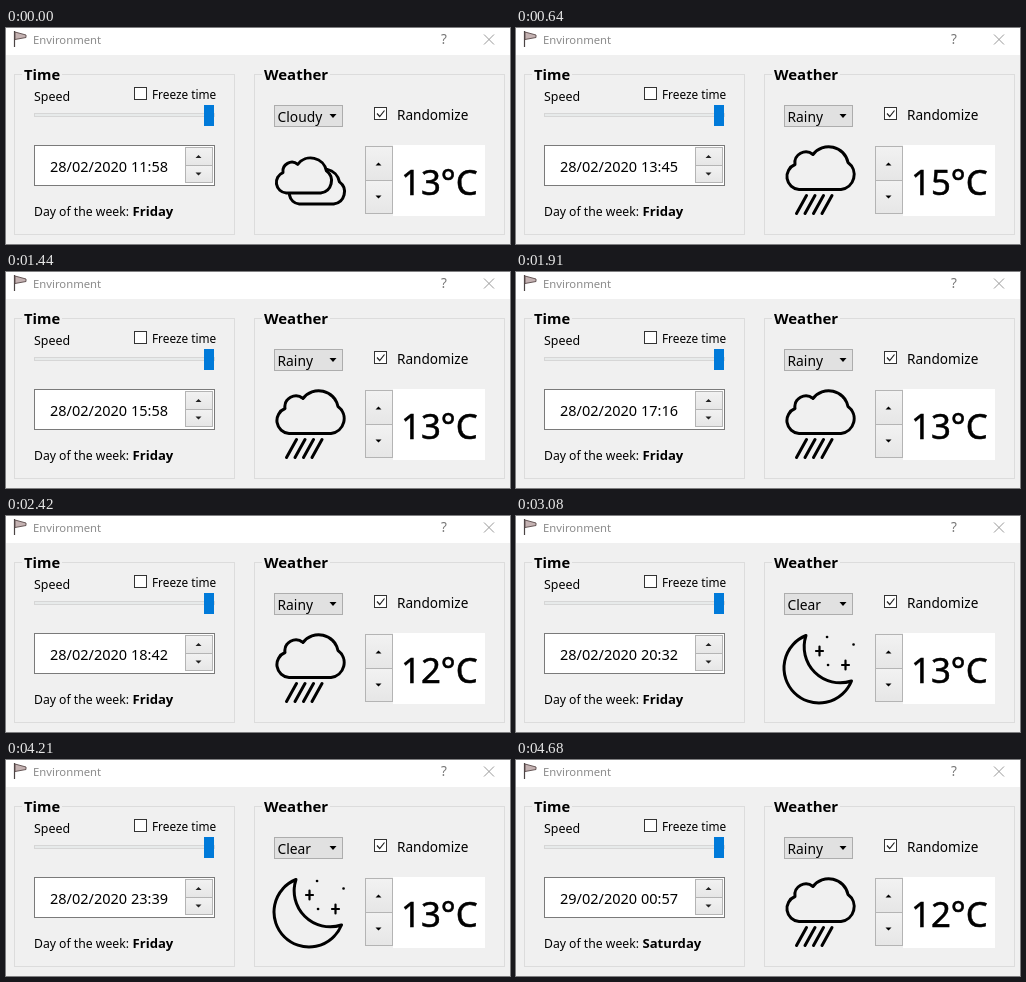
Animation of 504 by 216 pixels, one loop 4720 ms. Source, as an HTML page:

```html
<!DOCTYPE html>
<html lang="en">
<head>
<meta charset="utf-8">
<title>Environment</title>
<style>
  html, body { margin: 0; width: 100%; height: 100%; overflow: hidden; background: #f0f0f0; }
  svg { display: block; width: 504px; height: 216px; }
  text { font-family: "Noto Sans", "Open Sans", sans-serif; white-space: pre; }
  .bold { font-weight: 700; }
  .crisp { shape-rendering: crispEdges; }
  .group { fill: none; stroke: #dcdcdc; }
  .field { fill: #fff; stroke: #7a7a7a; }
  .button { fill: url(#shade); stroke: #b4b4b4; }
  .combo { fill: #e1e1e1; stroke: #adadad; }
  .box { fill: #fff; stroke: #333; }
  .icon { display: none; fill: none; stroke: #000; stroke-width: 3; stroke-linecap: round; stroke-linejoin: round; }
  .cloud { fill: #f0f0f0; vector-effect: non-scaling-stroke; }
  [data-weather="Cloudy"] .cloudy,
  [data-weather="Rainy"] .rainy,
  [data-weather="Clear"] .clear { display: inline; }
</style>
</head>
<body>
<svg id="panel" viewBox="0 0 504 216" data-weather="Cloudy">
  <defs>
    <linearGradient id="shade" x2="0" y2="1">
      <stop stop-color="#f2f2f2"/>
      <stop offset="1" stop-color="#e6e6e6"/>
    </linearGradient>
    <path id="cloud" class="cloud" d="M283 161.500A13 13 0 0 1 279 136.500A11 11 0 0 1 297 126.500A19.700 19.700 0 0 1 332 134.500A15 15 0 0 1 325 161.500Z"/>
  </defs>
  <rect width="504" height="216" fill="#f0f0f0"/>

  <!-- title bar -->
  <rect width="504" height="27" fill="#fff"/>
  <path d="M8.500 3V19" stroke="#4a4444" stroke-width="1.2"/>
  <path d="M9 4L20 7V9.500L9 11.500Z" fill="#c4b2b2" stroke="#5a4a4a" stroke-width=".9"/>
  <text x="27" y="15.5" font-size="11.3" fill="#8c8c8c">Environment</text>
  <text x="435" y="16" font-size="13.5" fill="#777">?</text>
  <path d="M478 6.500L488 16.500M488 6.500L478 16.500" stroke="#999"/>

  <!-- time group -->
  <rect class="group crisp" x="8.500" y="46.500" width="220" height="160"/>
  <rect x="16" y="40" width="40" height="12" fill="#f0f0f0"/>
  <text class="bold" x="18" y="52" font-size="14.7">Time</text>
  <text x="28" y="73" font-size="12.4">Speed</text>
  <rect class="box crisp" x="128.500" y="59.500" width="12" height="12"/>
  <text x="146" y="71" font-size="11.8">Freeze time</text>
  <rect class="crisp" x="28.500" y="85.500" width="180" height="3" fill="#e7eaea" stroke="#d6d6d6"/>
  <rect x="198" y="77" width="10" height="21" fill="#007ad9"/>
  <g class="crisp">
    <rect class="field" x="28.500" y="117.500" width="180" height="40"/>
    <rect class="button" x="179.500" y="119.500" width="27" height="18"/>
    <rect class="button" x="179.500" y="137.500" width="27" height="17"/>
  </g>
  <path d="M189.500 130L192.500 127L195.500 130ZM189.500 144.500L192.500 147.500L195.500 144.500Z" fill="#222"/>
  <text id="stamp" x="44" y="144" font-size="14.5"></text>
  <text x="28" y="188" font-size="12.2">Day of the week:</text>
  <text id="day" class="bold" x="126.500" y="188" font-size="13.1"></text>

  <!-- weather group -->
  <rect class="group crisp" x="248.500" y="46.500" width="250" height="160"/>
  <rect x="256" y="40" width="68" height="12" fill="#f0f0f0"/>
  <text class="bold" x="258" y="52" font-size="15">Weather</text>
  <rect class="combo crisp" x="268.500" y="77.500" width="68" height="21"/>
  <text id="sky" x="271.500" y="94" font-size="13.8"></text>
  <path d="M323.500 86H330.500L327 90Z"/>
  <rect class="box crisp" x="368.500" y="79.500" width="12" height="12"/>
  <path d="M371 85.500L373.700 88.500L378.500 82.500" fill="none" stroke="#222" stroke-width="1.2"/>
  <text x="391" y="92" font-size="13.6">Randomize</text>
  <rect x="387" y="117" width="92" height="71" fill="#fff"/>
  <g class="crisp">
    <rect class="button" x="359.500" y="118.500" width="27" height="34"/>
    <rect class="button" x="359.500" y="152.500" width="27" height="33"/>
  </g>
  <path d="M369.500 137.500L372.500 134.500L375.500 137.500ZM369.500 167.500L372.500 170.500L375.500 167.500Z"/>
  <text id="temp" x="395" y="166.500" font-size="34.800" stroke="#000" stroke-width=".5"></text>

  <g class="icon cloudy">
    <use href="#cloud" transform="translate(61.200 43.600) scale(.82)"/>
    <use href="#cloud" transform="translate(48.200 32.600) scale(.82)"/>
  </g>
  <g class="icon rainy">
    <use href="#cloud"/>
    <path d="M290.500 167.500L280.500 185.500M299 167.500L289 185.500M307.500 167.500L297.500 185.500M316 167.500L306 185.500"/>
  </g>
  <g class="icon clear">
    <path d="M290 119.500A35 35 0 1 0 335.500 165A36 36 0 0 1 290 119.500Z"/>
    <path d="M303.500 130.500V139.500M300 135H307M329.500 144.500V153.500M326 149H333" stroke-width="2.2"/>
    <path d="M311 121h.1M337.500 128.500h.1M312 149h.1" stroke-width="2.6"/>
  </g>
</svg>
<script>
  const LOOP = 4720, TICK = 46.8, LAST = 100;
  const START = 11 * 60 + 58, DAY = 24 * 60;
  // One reading per hour, from 11:00 on
  const temps = [13, 14, 15, 14, 13, 14, 13, 12, 13, 13, 14, 12, 13, 12];

  const $ = id => document.getElementById(id);
  const pad = n => String(n).padStart(2, "0");

  function put(id, value) {
    if ($(id).textContent !== value) $(id).textContent = value;
  }

  // Simulated minutes since midnight, advancing in ticks
  function clock(ms) {
    if (ms < 40) return START;
    const tick = Math.min(LAST, Math.floor((ms - 30) / TICK) + 1);
    return START + Math.round(7.81 * tick - 1.9);
  }

  // The sky is drawn anew every four hours
  function skyAt(hour) {
    if (hour < 12) return "Cloudy";
    return hour >= 20 && hour < 24 ? "Clear" : "Rainy";
  }

  function render(ms) {
    const now = clock(ms);
    const hour = Math.floor(now / 60);
    const late = now >= DAY;
    const sky = skyAt(hour);
    put("stamp", `${late ? 29 : 28}/02/2020 ${pad(hour % 24)}:${pad(now % 60)}`);
    put("day", late ? "Saturday" : "Friday");
    put("sky", sky);
    put("temp", temps[hour - 11] + "°C");
    $("panel").dataset.weather = sky;
  }

  const origin = performance.now();
  function loop() {
    render((performance.now() - origin) % LOOP);
    requestAnimationFrame(loop);
  }
  loop();
</script>
</body>
</html>
```
